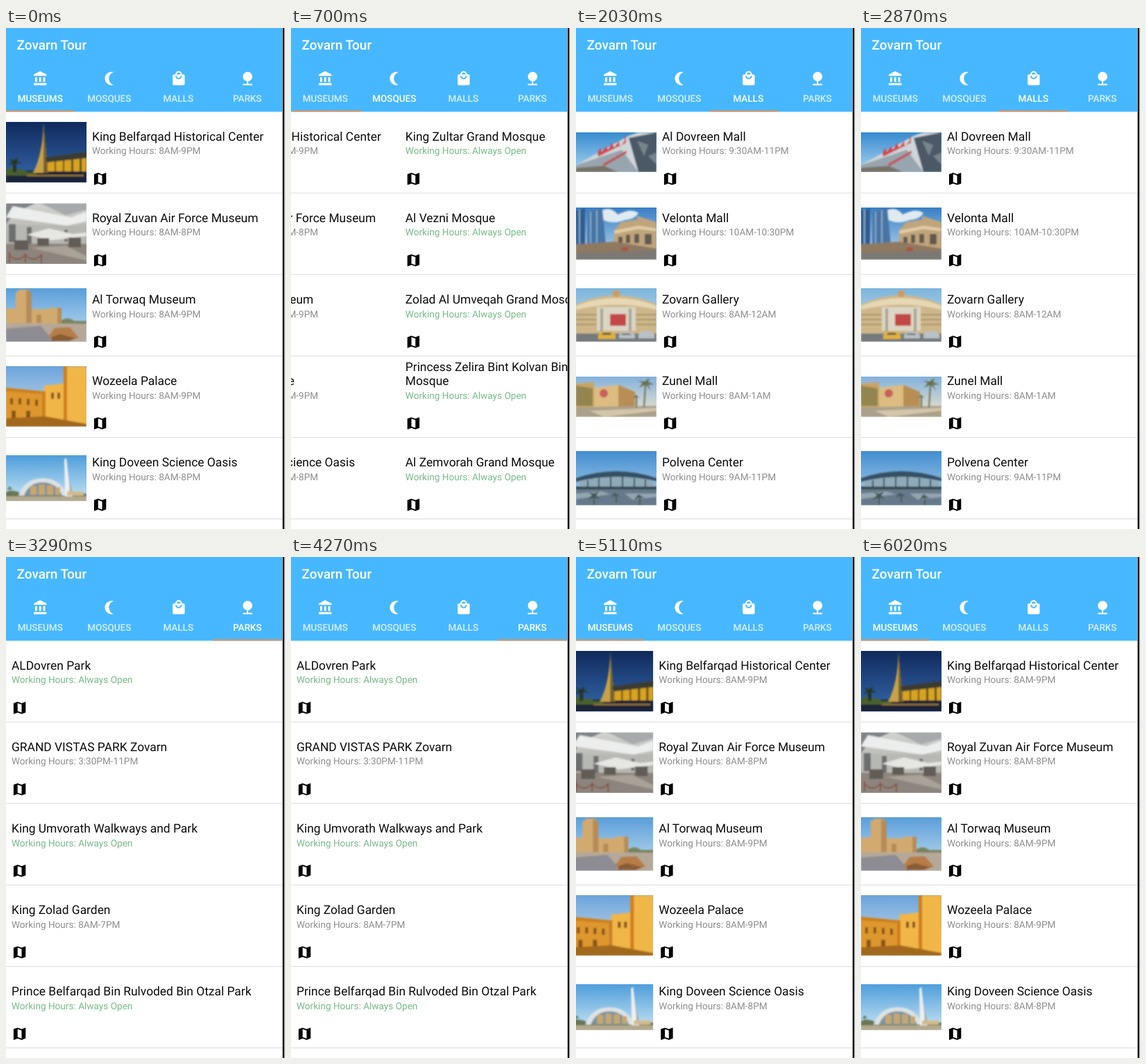
An HTML page for the animation above (6.09 s loop, 402x720 px).

```html
<!DOCTYPE html>
<html lang="en">
<head>
<meta charset="utf-8">
<title>City guide</title>
<style>
  html, body { margin: 0; width: 100%; height: 100%; overflow: hidden; background: #fff; }
  svg { display: block; }
  text { font-family: Roboto, sans-serif; text-rendering: geometricPrecision; }
  .bar { font-size: 19px; font-weight: 500; fill: #fff; }
  .tab { font-size: 13.5px; font-weight: 500; fill: #fff; fill-opacity: .78; text-anchor: middle; }
  .tab.on { fill-opacity: 1; }
  .name { font-size: 17.4px; fill: #0c0c0c; }
  .hours { font-size: 13.6px; fill: #8d8d8d; }
  .open { fill: #76b988; }
</style>
</head>
<body>
<svg id="stage" width="402" height="720" viewBox="0 0 402 720"></svg>
<script>
const LOOP = 6090, STEP = 70;
const PAGE = 398, TAB = PAGE / 4, ROW = 117.1, TOP = 120, BAR = 120.4;
const ALWAYS = 'Always Open';

const ICONS = {
  museum: 'M4 10v7h3v-7H4zm6 0v7h3v-7h-3zM2 22h19v-3H2v3zm14-12v7h3v-7h-3zm-4.5-9L2 6v2h19V6l-9.5-5z',
  moon: 'M15 2c1.05 0 2.05.16 3 .46-4.06 1.27-7 5.06-7 9.54 0 4.48 2.94 8.27 7 9.54-.95.3-1.95.46-3 .46-5.52 0-10-4.48-10-10S9.48 2 15 2z',
  bag: 'M19 6h-2c0-2.76-2.24-5-5-5S7 3.24 7 6H5c-1.1 0-2 .9-2 2v12c0 1.1.9 2 2 2h14c1.1 0 2-.9 2-2V8c0-1.1-.9-2-2-2zm-7-3c1.66 0 3 1.34 3 3H9c0-1.66 1.34-3 3-3zm0 10c-2.76 0-5-2.24-5-5h2c0 1.66 1.34 3 3 3s3-1.34 3-3h2c0 2.76-2.24 5-5 5z',
  tree: 'M13 16.12c3.47-.41 6.17-3.36 6.17-6.95 0-3.87-3.13-7-7-7s-7 3.13-7 7c0 3.47 2.52 6.34 5.83 6.89V20H5v2h14v-2h-6v-3.88z',
  map: 'M20.5 3l-.16.03L15 5.1 9 3 3.36 4.9c-.21.07-.36.25-.36.48V20.5c0 .28.22.5.5.5l.16-.03L9 18.9l6 2.1 5.64-1.9c.21-.07.36-.25.36-.48V3.5c0-.28-.22-.5-.5-.5zM15 19l-6-2.11V5l6 2.11V19z'
};

// Pictures: top, height, sky colours, then [colour, path] shapes.
const museumPhotos = [
  [135, 87, '#102a5c', '#3568ac', [
    ['#1c2338', 'M0 70H116V87H0z'], ['#48602f', 'M0 70q6-8 14 0q8-5 16 2h14v5H0z'],
    ['#283528', 'M10 72V60l-7 2 6-5-5-4 8 2 5-4-1 5 7 4-8-1v13z'],
    ['#c6a34a', 'M54 2Q57 40 61 73H39Q53 46 54 2z'], ['#77612d', 'M54 2Q57 40 61 73H54z'],
    ['#3b3b32', 'M57 51L116 43V52L59 58z'], ['#d6a321', 'M60 58L116 52V71H60z'],
    ['#5d4a1c', 'M70 56h2v15h-2zM82 55h2v16h-2zM94 54h3v17h-3zM106 53h3v18h-3z'],
    ['#98792c', 'M30 76H112V78H30z']]],
  [252, 87, '#d2d3d0', '#9a9791', [
    ['#7f8488', 'M0 0H42L12 14 0 30z'], ['#eceded', 'M10 4L94 20 116 12V26L88 32 0 20z'],
    ['#a6aaac', 'M50 0H116V9L86 17z'], ['#b7b7b3', 'M0 32H116V58H0z'],
    ['#6c6e70', 'M4 30h10v26H4zM30 34h7v25h-7zM84 38h5v17h-5z'],
    ['#e6e6e3', 'M30 45L62 36 96 44 116 42V47L66 53z'], ['#8c857d', 'M0 58H116V87H0z'],
    ['#625b57', 'M12 53h20v14H12zM45 50h17v11H45zM90 49h18v14H90z'],
    ['#a9a299', 'M36 64L86 61 116 76V82z'],
    ['#854f43', 'M4 70h2v15H4zM27 72h2v13h-2zM50 73h2v13h-2zM5 73q11 12 23 0q11 12 23 0v2q-11 12-23 0q-12 12-23 0z']]],
  [374, 77, '#5a9ed9', '#c7e0f1', [
    ['#d2aa70', 'M0 29H14V5h4V2h16v4h3V30H62V28h18V53H0z'],
    ['#b58c58', 'M29 3h5v3h3V50h-8zM74 28h6v25h-6zM44 38h7v12h-7z'],
    ['#788461', 'M80 46q9-6 18 1h18v7H80z'], ['#b6a898', 'M0 50L116 51V77H0z'],
    ['#8d8c92', 'M0 58L50 54 70 77H0z'], ['#b67d46', 'M62 68L70 57 92 56 105 71 90 76H66z'],
    ['#885b36', 'M66 70L78 66 100 72 90 76H66z']]],
  [486, 87, '#6ca4db', '#d4e2ed', [
    ['#dd972f', 'M0 31L52 36V78H0z'], ['#f0b646', 'M55 28L83 25V0H116V87H55z'],
    ['#cf7f1d', 'M83 0h5V87H83zM52 36h5V78h-5zM0 31L52 36V40L0 36z'],
    ['#8a5316', 'M6 46h4v9H6zM18 46h4v9h-4zM30 47h4v9h-4zM42 48h4v9h-4zM8 64h6v12H8zM29 64h6v12h-6zM65 38h4v9h-4zM74 38h4v9h-4z'],
    ['#a2681e', 'M0 75L56 72 116 83V87H0z']]],
  [614, 66, '#4e9edb', '#cae5f3', [
    ['#b4a98d', 'M0 56H116V66H0z'], ['#6b7654', 'M0 53q10-5 22 2h94v4H0z'],
    ['#dbe2e4', 'M18 58Q27 33 53 33T88 58z'], ['#7d929d', 'M26 58Q33 39 53 39T81 58z'],
    ['#c4a670', 'M35 44h9v13h-9zM47 42h9v15h-9zM59 43h9v14h-9zM71 46h7v11h-7z'],
    ['#edf0ef', 'M84 6l3-2 4 36 5 19H85z'], ['#a5a69d', 'M91 34l5 22h-4z'],
    ['#d1bb8e', 'M88 52H112V58H88z'], ['#4f6c4b', 'M5 56V48l-4 2 4-5 5 4-4-1v8z']]]
];

const mallPhotos = [
  [150, 57, '#378bd0', '#a8d3ef', [
    ['#cfd6da', 'M0 47L76 5 90 0H116V57H0z'], ['#98a5ae', 'M0 47L66 25 90 57H0z'],
    ['#4b5966', 'M76 8L116 0V57H90z'], ['#77848c', 'M88 12l16 6-6 16zM104 34l12-5v17z'],
    ['#cf4a50', 'M31 30l4-8 2 6 7-8 2 5 6-10 3 7 7-10 1 9 7-9v-7h2v10l-40 20z'],
    ['#c2535a', 'M39 45L73 26v4L40 49z'], ['#777369', 'M0 51L40 48 60 57H0z']]],
  [258, 75, '#397fc5', '#c1dbed', [
    ['#dfeaf1', 'M35 5q15-8 25 5q20-10 30-2q-5 9-20 10q-20 8-35-3z'],
    ['#305c8f', 'M0 4L13 1V55H0z'], ['#4675a6', 'M17 6L38 1 43 55H16z'],
    ['#86abc9', 'M4 3h2v52H4zM20 6h2v48h-2zM29 4h2v50h-2z'],
    ['#bfa47c', 'M55 33L65 21 88 17V12L116 21V66H55z'], ['#e0cba5', 'M55 33L90 26 116 30V34L90 31 55 38z'],
    ['#645a50', 'M61 42h6v9h-6zM72 39h6v12h-6zM84 38h7v13h-7zM99 38h10v15H99z'],
    ['#8f7961', 'M0 53L55 49 116 59V68H0z'], ['#7b7974', 'M0 65L116 62V75H0z'],
    ['#a4584a', 'M65 57h10v6H65z']]],
  [374, 77, '#7cb5dc', '#dbe6e6', [
    ['#cdb78a', 'M0 23Q58-3 116 23V67H0z'], ['#e6d8b4', 'M0 25Q58 3 116 25V31Q58 16 0 31z'],
    ['#a8946a', 'M0 37H30v2H0zM0 44H30v2H0zM0 51H30v2H0zM86 37h30v2H86zM86 44h30v2H86zM86 51h30v2H86z'],
    ['#dcd5c4', 'M30 27H86V61H30z'], ['#a8a594', 'M35 29h4v33h-4zM76 29h4v33h-4z'],
    ['#c24a47', 'M49 37H72V54H49z'], ['#d29a5a', 'M53 8a5 5 0 1 0 10 0a5 5 0 1 0-10 0'],
    ['#777a7b', 'M0 65H116V77H0z'], ['#dfb23a', 'M32 67l6-5h13l6 5v6H32z'],
    ['#b9c1c7', 'M62 67l5-4h13l5 4v5H62zM90 66l5-4h13l5 4v6H90z'],
    ['#575a59', 'M39 64h10l3 3H37zM67 65h10l3 2H65z']]],
  [501, 58, '#83b1dc', '#f4e8cb', [
    ['#c9a363', 'M0 10L26 8V45H0z'], ['#dcbc80', 'M26 16L61 12 85 22V46H26z'],
    ['#93854f', 'M0 13L24 17V42H0z'], ['#b78f55', 'M61 12L85 22V46H61z'],
    ['#c7605a', 'M34 24a6 6 0 1 0 12 0a6 6 0 1 0-12 0'],
    ['#aaa18d', 'M0 44L116 42V58H0z'], ['#d3c6a8', 'M20 49L116 45V49L40 58z'],
    ['#6b7152', 'M97 44L99 12l-8 4 5-7-7-3 10 1 7-5-2 6 9 3-9 1 4 8-7-8-2 32zM86 44V29l-4 2 4-5 5 4-3 0v14z']]],
  [608, 78, '#428dd0', '#b5d6ee', [
    ['#355064', 'M0 39Q58 19 116 39V43Q58 31 0 44z'], ['#8fabba', 'M5 43Q58 31 112 43V53H5z'],
    ['#304651', 'M16 42h2v12h-2zM32 39h2v15h-2zM49 37h2v17h-2zM66 37h2v17h-2zM83 39h2v15h-2zM99 41h2v13h-2zM0 51H116V56H0z'],
    ['#66798a', 'M0 55H116V78H0z'], ['#93a5b2', 'M0 61L36 58 50 62 0 69zM70 61H116V66L82 70z'],
    ['#3f584f', 'M25 77V67l-8 3 6-7-5-4 8 2 7-3-4 6 6 5-8-2v10zM57 74V64l-7 3 6-7 9 6-6-2v10zM91 78V67l-7 3 6-8 9 6-6-1v11z']]]
];

const tabs = [
  { label: 'MUSEUMS', icon: 'museum', x: 38.1, photos: museumPhotos, rows: [
    ['King Belfarqad Historical Center', '8AM-9PM'], ['Royal Zuvan Air Force Museum', '8AM-8PM'],
    ['Al Torwaq Museum', '8AM-9PM'], ['Wozeela Palace', '8AM-9PM'], ['King Doveen Science Oasis', '8AM-8PM']] },
  { label: 'MOSQUES', icon: 'moon', x: 137.6, rows: [
    ['King Zultar Grand Mosque', ALWAYS], ['Al Vezni Mosque', ALWAYS], ['Zolad Al Umveqah Grand Mosque', ALWAYS],
    ['Princess Zelira Bint Kolvan Bin Belfarqad Grand|Mosque', ALWAYS], ['Al Zemvorah Grand Mosque', ALWAYS]] },
  { label: 'MALLS', icon: 'bag', x: 237.2, photos: mallPhotos, rows: [
    ['Al Dovreen Mall', '9:30AM-11PM'], ['Velonta Mall', '10AM-10:30PM'], ['Zovarn Gallery', '8AM-12AM'],
    ['Zunel Mall', '8AM-1AM'], ['Polvena Center', '9AM-11PM']] },
  { label: 'PARKS', icon: 'tree', x: 336.4, rows: [
    ['ALDovren Park', ALWAYS], ['GRAND VISTAS PARK Zovarn', '3:30PM-11PM'], ['King Umvorath Walkways and Park', ALWAYS],
    ['King Zolad Garden', '8AM-7PM'], ['Prince Belfarqad Bin Rulvoded Bin Otzal Park', ALWAYS]] }
];

const rect = (x, y, w, h, fill, extra = '') =>
  `<rect x="${x}" y="${y}" width="${w}" height="${h}" fill="${fill}" ${extra}/>`;
const text = (x, y, style, words) => `<text x="${x}" y="${y}" class="${style}">${words}</text>`;
const icon = (name, x, y, fill) =>
  `<path d="${ICONS[name]}" fill="${fill}" transform="translate(${x} ${y}) scale(.967)"/>`;

// The shapes are softened a little; the nested svg keeps the picture's edge sharp.
function photo([y, h, high, low, shapes], id) {
  return `<linearGradient id="${id}" x2="0" y2="1"><stop stop-color="${high}"/><stop offset="1" stop-color="${low}"/></linearGradient>
    <svg y="${y}" width="116" height="${h}">${rect(0, 0, 116, h, `url(#${id})`)}
    <g filter="url(#soft)">${shapes.map(([fill, d]) => `<path d="${d}" fill="${fill}"/>`).join('')}</g></svg>`;
}

function row([name, hours], i, x) {
  const y = TOP + i * ROW, lines = name.split('|');
  return lines.map((line, n) => text(x, y + 42 - 20.3 * (lines.length - 1 - n), 'name', line)).join('')
    + text(x, y + 61.3, hours === ALWAYS ? 'hours open' : 'hours', 'Working Hours: ' + hours)
    + icon('map', x, y + 85.2, '#000');
}

function page({ rows, photos = [] }, p) {
  return `<g transform="translate(${p * PAGE})">`
    + photos.map((item, i) => photo(item, `sky${p}${i}`)).join('')
    + rows.map((item, i) => row(item, i, photos.length ? 124 : 8)).join('') + '</g>';
}

document.getElementById('stage').innerHTML =
  '<filter id="soft"><feGaussianBlur stdDeviation=".8"/></filter>'
  + rect(0, 0, 402, 720, '#fff')
  + `<g id="pages">${tabs.map(page).join('')}</g>`
  + [1, 2, 3, 4, 5].map(i => rect(0, TOP + i * ROW - .5, PAGE, 1, '#dcdcdc')).join('')
  + rect(0, 0, PAGE, BAR, '#47b8ff') + text(15.5, 31, 'bar', 'Zovarn Tour')
  + tabs.map((tab, i) => icon(tab.icon, tab.x, 61, '#fff')
    + text((i + .5) * TAB - .5, 106.3, 'tab', tab.label)).join('')
  + rect(0, BAR - 2.2, TAB, 2.2, '#d2966b', 'id="indicator"')
  + rect(PAGE, 0, 4, 720, '#f0f0f0') + rect(PAGE + .6, 0, 2.5, 720, '#111');

const pages = document.getElementById('pages');
const indicator = document.getElementById('indicator');
const labels = document.querySelectorAll('.tab');

const taps = [
  { at: 666, from: 0, to: 1 },
  { at: 1817, from: 1, to: 2 },
  { at: 2890, from: 2, to: 3 },
  { at: 4842, from: 3, to: 0 }
];

const clamp = v => Math.min(1, Math.max(0, v));
const mix = (a, b, k) => a + (b - a) * k;
const quintOut = k => 1 - (1 - k) ** 5;

// cubic-bezier(.4, 0, .2, 1)
function standardEase(k) {
  let lo = 0, hi = 1;
  for (let i = 0; i < 20; i++) {
    const s = (lo + hi) / 2, r = 1 - s;
    if (1.2 * s * r * r + .6 * s * s * r + s ** 3 < k) lo = s; else hi = s;
  }
  return lo * lo * (3 - 2 * lo);
}

function draw(time) {
  const t = Math.floor(time % LOOP / STEP) * STEP;
  const { at, from, to } = taps.filter(tap => tap.at <= t).pop() || { at: -LOOP, from: 0, to: 0 };
  const distance = Math.abs(to - from);
  const scroll = mix(from, to, quintOut(clamp((t - at) / (100 * (distance + 1)))));
  pages.setAttribute('transform', `translate(${-scroll * PAGE})`);

  // A far jump grows the indicator from a point just beyond the chosen tab.
  const far = distance > 1, point = (to + 1) * TAB + 23.2;
  const k = standardEase(clamp((t - at) / 300));
  const left = mix(far ? point : from * TAB, to * TAB, k);
  const right = mix(far ? point : (from + 1) * TAB, (to + 1) * TAB, k);
  indicator.setAttribute('x', left - 1);
  indicator.setAttribute('width', right - left);
  labels.forEach((label, i) => label.classList.toggle('on', i === to));
}

function tick() {
  draw(performance.now());
  requestAnimationFrame(tick);
}
tick();
</script>
</body>
</html>
```
